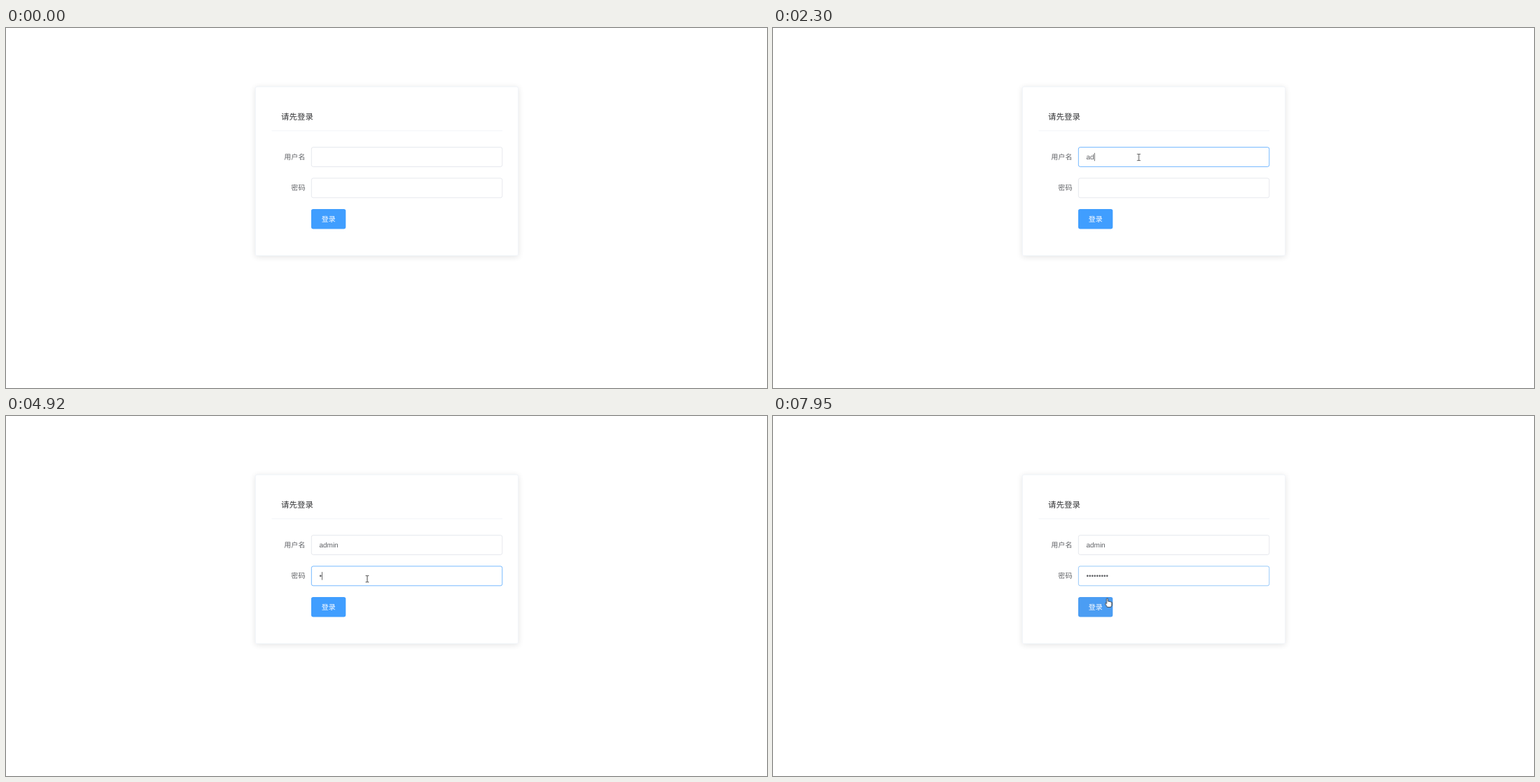
Recreate the animation shown at these times as an HTML page. Size 1087 by 515 pixels, loop 8000 ms.

```html
<!DOCTYPE html>
<html lang="zh-CN">
<head>
<meta charset="utf-8">
<title>登录</title>
<style>
  :root { --line: #dcdfe6; --hover: #c0c4cc; --focus: #409eff; --primary: #409eff; }
  * { box-sizing: border-box; }
  html, body { margin: 0; width: 100%; height: 100%; overflow: hidden; background: #fff; }
  body { position: relative; }

  /* The page is laid out 1520 pixels wide and shown on a stage of 1087. */
  .page {
    position: absolute; left: 0; top: 0; width: 1520px; height: 720px;
    transform: translateX(-.25px) scale(.71513); transform-origin: 0 0;
    color: #606266; white-space: pre;
    font: 14px/40px "Liberation Sans", "Noto Sans CJK SC", "Noto Sans CJK", sans-serif;
    text-rendering: geometricPrecision;
  }
  .page > * { position: absolute; }
  .card {
    left: 498px; top: 117px; width: 526px; height: 339px;
    border: 1px solid #ebeef5; border-radius: 4px; box-shadow: 0 2px 12px rgba(0, 0, 0, .11);
  }
  .title { left: 550px; top: 159px; font-size: 16px; color: #303133; }
  .rule { left: 531px; top: 205px; width: 461px; height: 1px; background: #ebeef5; }
  .label { left: 530px; width: 68px; text-align: right; }
  .field {
    left: 610px; width: 382px; height: 40px; padding-left: 15px; line-height: 38px;
    border: 1px solid var(--line); border-radius: 4px;
  }
  .user { top: 238px; }
  .pass { top: 300px; }
  .button {
    left: 610px; top: 362px; width: 69px; height: 40px; line-height: 42px;
    border-radius: 4px; text-align: center; color: #fff; background: var(--primary);
  }
  .typed { display: inline-block; vertical-align: top; overflow: hidden; }
  .caret { position: absolute; top: 11px; width: 1px; height: 16px; background: #333; }
  .cursor { position: absolute; left: 0; top: 0; overflow: visible; }

  .field, .button { animation: 8s linear infinite; }
  .typed, .caret, .cursor, .cursor g { animation: 8s step-end infinite; }
  .field.user { animation-name: user-border; }
  .field.pass { animation-name: pass-border; }
  .button { animation-name: press; }
  .user .typed { animation-name: type-name; }
  .pass .typed { animation-name: type-bullets; }
  .user .caret { animation-name: user-caret; }
  .pass .caret { animation-name: pass-caret; }
  .cursor { animation-name: travel; }
  .cursor .arrow { animation-name: arrow; }
  .cursor .beam { animation-name: beam; }
  .cursor .hand { animation-name: hand; }

  @keyframes user-border {
    0%, 9.37% { border-color: var(--line); }
    9.375%, 12% { border-color: var(--hover); }
    14%, 54.8% { border-color: var(--focus); }
    56.75%, 100% { border-color: var(--line); }
  }
  @keyframes pass-border {
    0%, 53.9% { border-color: var(--line); }
    54.8% { border-color: var(--hover); }
    56.75%, 98.4% { border-color: var(--focus); }
    99.37%, 100% { border-color: #6db2f6; }
  }
  @keyframes press {
    0%, 97.4% { background: var(--primary); }
    98.4% { background: #60adfc; }
    99.37%, 100% { background: #4b9df3; }
  }
  /* Each key press uncovers the width of one more character. */
  @keyframes type-name {
    0% { width: 0; }
    23.75% { width: .556em; }
    28.75% { width: 1.112em; }
    35.625% { width: 1.945em; }
    38.5% { width: 2.167em; }
    40.375%, 100% { width: 2.723em; }
  }
  @keyframes type-bullets {
    0% { width: 0; }
    61.5% { width: .35em; }
    64.375% { width: .7em; }
    68.375% { width: 1.05em; }
    72.25% { width: 1.4em; }
    75.125% { width: 1.75em; }
    79% { width: 2.1em; }
    83% { width: 2.45em; }
    86.75% { width: 2.8em; }
    90.75%, 100% { width: 3.15em; }
  }
  @keyframes user-caret {
    0%, 19%, 46.125%, 54.86% { visibility: hidden; }
    12.25%, 23.75%, 52.75% { visibility: visible; }
  }
  @keyframes pass-caret {
    0%, 97.375% { visibility: hidden; }
    54.86% { visibility: visible; }
  }
  @keyframes travel {
    0% { transform: translate(1009px, 503px); }
    2.83% { transform: translate(880px, 420px); }
    3.79% { transform: translate(745px, 333px); }
    4.75% { transform: translate(645px, 268px); }
    5.71% { transform: translate(576px, 222px); }
    6.66% { transform: translate(537px, 194px); }
    7.625% { transform: translate(522.5px, 185px); }
    50.125% { transform: translate(522.5px, 192.5px); }
    51.08% { transform: translate(521px, 203px); }
    52.03% { transform: translate(519px, 214px); }
    52.96% { transform: translate(517px, 225px); }
    53.91% { transform: translate(516px, 231px); }
    54.86% { transform: translate(516px, 233px); }
    93.625% { transform: translate(513px, 235px); }
    94.59% { transform: translate(507px, 241px); }
    95.55% { transform: translate(499px, 249px); }
    96.5% { transform: translate(491px, 256px); }
    97.46% { transform: translate(484px, 261px); }
    98.43%, 100% { transform: translate(477.5px, 261px); }
  }
  @keyframes arrow {
    0%, 6.66%, 52.96%, 97.46% { visibility: hidden; }
    1.875%, 51.08%, 95.55% { visibility: visible; }
  }
  @keyframes beam {
    0%, 51.08%, 95.55% { visibility: hidden; }
    6.66%, 52.96% { visibility: visible; }
  }
  @keyframes hand {
    0% { visibility: hidden; }
    97.46%, 100% { visibility: visible; }
  }
</style>
</head>
<body>
  <div class="page">
    <div class="card"></div>
    <div class="title">请先登录</div>
    <div class="rule"></div>
    <div class="label user">用户名</div>
    <div class="field user"><span class="typed">admin</span><i class="caret"></i></div>
    <div class="label pass">密码</div>
    <div class="field pass"><span class="typed">•••••••••</span><i class="caret"></i></div>
    <div class="button">登录</div>
  </div>
  <svg class="cursor" width="1" height="1" stroke-linejoin="round">
    <g class="arrow" fill="#fff" stroke="#222" stroke-width=".7">
      <path d="M0 0V12L2.8 9.4 4.6 13.4 6.3 12.6 4.6 8.7H8.4Z"/>
    </g>
    <g class="beam" fill="none" stroke="#333" stroke-width=".9">
      <path d="M-2.3-4.6H-.6L0-4 .6-4.6H2.3M0-4V4M-2.3 4.6H-.6L0 4 .6 4.6H2.3"/>
    </g>
    <g class="hand" fill="#fff" stroke="#222" stroke-width=".8">
      <path d="M-1 .4Q0-1 1 .4V4.2Q2.2 3.4 2.9 4.6 4.2 3.9 4.7 5.1 6.2 4.6 6.3 6V9Q6.3 10.5 5.2 12.4H-.2Q-1.2 10.2-3.2 7.6-3.3 5.9-1 7.4Z"/>
    </g>
  </svg>
</body>
</html>
```
